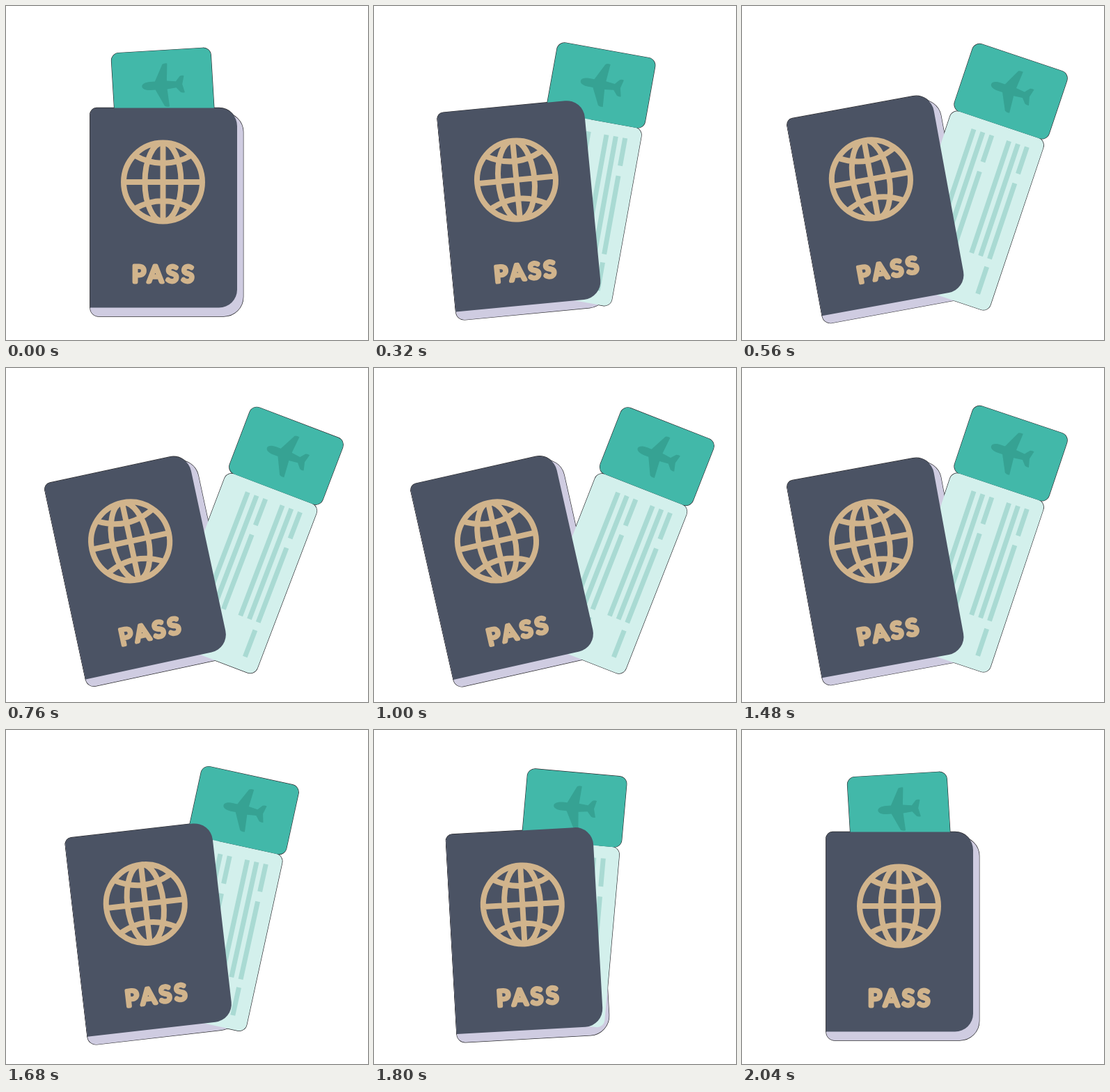
Animation of 520 by 480 pixels, one loop 2.08 s. Source, as an HTML page with a canvas:

```html
<!DOCTYPE html>
<html>
<head>
<meta charset="utf-8">
<style>
  html, body { margin: 0; width: 100%; height: 100%; overflow: hidden; background: #fff; }
  canvas { display: block; }
</style>
</head>
<body>
<canvas width="520" height="480"></canvas>
<script>
const ctx = document.querySelector('canvas').getContext('2d');
const STEP = 40, STEPS = 52;
const GOLD = '#d1b48c';

const box = (x, y, w, h, radii) => {
  const path = new Path2D();
  path.roundRect(x, y, w, h, radii);
  return path;
};

// Passport in stage coordinates, ticket relative to its top centre
const pages = box(121, 154, 219.8, 292, [0, 27, 28, 12]);
const cover = box(121, 146.5, 211, 287, [9, 26, 26, 0]);
const stub = box(-71.5, 0, 143, 102, 11);
const slip = box(-71.3, 102, 141.2, 260, 11);

const plane = new Path2D(`M-30 0C-30-4-24-6-18-6L-11-6 1-30Q4-32 8-31L6-6 19-4.5 25-11.5Q28-13 31-12
  L28 0 31 12Q28 13 25 11.5L19 4.5 6 6 8 31Q4 32 1 30L-11 6-18 6C-24 6-30 4-30 0Z`);

const bars = new Path2D();
for (const x of [-33, 20.3]) {
  const bar = (col, top, bottom) => bars.rect(x + col * 13.6 - 3.5, top, 7, bottom - top);
  bar(0, 119.5, 289);
  bar(1, 119.5, 289);
  bar(2, 119.5, 160);
  bar(2, 174.5, 289);
  bar(2, 301, 342);
}

const globe = new Path2D('M0-56V56M-56 0H56M-42-39Q0-15 42-39M-42 39Q0 15 42 39');
for (const rx of [56.5, 26]) {
  globe.moveTo(rx, 0);
  globe.ellipse(0, 0, rx, 56.5, 0, 0, Math.PI * 2);
}

const mix = (a, b, p) => a + (b - a) * p;

// Cubic Bezier easing with handles (x1, 0) and (x2, 1)
function ease(x1, x2, x) {
  x = Math.min(1, x);
  let lo = 0, hi = 1;
  for (let i = 0; i < 24; i++) {
    const t = (lo + hi) / 2, s = 1 - t;
    if (3 * s * s * t * x1 + 3 * s * t * t * x2 + t * t * t < x) lo = t;
    else hi = t;
  }
  return lo * lo * (3 - 2 * lo);
}

function posed(pose, paint) {
  ctx.save();
  ctx.translate(pose.x, pose.y);
  ctx.rotate(pose.deg * Math.PI / 180);
  ctx.translate(-pose.cx, -pose.cy);
  paint();
  ctx.restore();
}

function fill(path, color) {
  ctx.fillStyle = color;
  ctx.fill(path);
}

function outline(...paths) {
  ctx.strokeStyle = '#2a2a2e';
  ctx.lineWidth = 1.3;
  paths.forEach(path => ctx.stroke(path));
}

function paintTicket() {
  fill(slip, '#d3f0ec');
  fill(bars, '#a9dad3');
  fill(stub, '#42b8a9');
  ctx.translate(0, 50);
  fill(plane, '#36a293');
}

function paintCover() {
  fill(cover, '#4b5364');
  ctx.strokeStyle = ctx.fillStyle = GOLD;
  // A thin face with a wide round stroke gives rounded bold letters
  ctx.lineJoin = ctx.lineCap = 'round';
  ctx.font = '400 32.5px Lato, sans-serif';
  ctx.letterSpacing = '4.6px';
  ctx.textAlign = 'center';
  ctx.lineWidth = 4.8;
  ctx.strokeText('PASS', 227.7, 397);
  ctx.fillText('PASS', 227.7, 397);
  ctx.translate(225.5, 253);
  ctx.lineCap = 'butt';
  ctx.lineWidth = 8;
  ctx.stroke(globe);
}

function draw(now) {
  const n = Math.floor(now / STEP) % STEPS;
  const k = Math.min(n, STEPS - 1 - n);
  const open = ease(0.325, 0.28, k / 25);
  const slide = ease(0.4, 0.2, (k + 1.3) / 25);
  const passport = { x: 183, y: 471.3, cx: 183, cy: 471.3, deg: -12.7 * open };
  const ticket = {
    x: mix(245, 285.2, slide), y: mix(446.3, 436.3, slide),
    cx: 0, cy: 383, deg: mix(-3.6, 21.4, slide)
  };

  ctx.fillStyle = '#fff';
  ctx.fillRect(0, 0, 520, 480);
  // Outlines go first, so only the outer silhouette keeps them
  posed(passport, () => outline(pages, cover));
  posed(ticket, () => outline(slip, stub));
  posed(passport, () => fill(pages, '#cfcce1'));
  posed(ticket, paintTicket);
  posed(passport, paintCover);
}

const start = performance.now();
function tick() {
  draw(performance.now() - start);
  requestAnimationFrame(tick);
}
tick();
</script>
</body>
</html>
```
